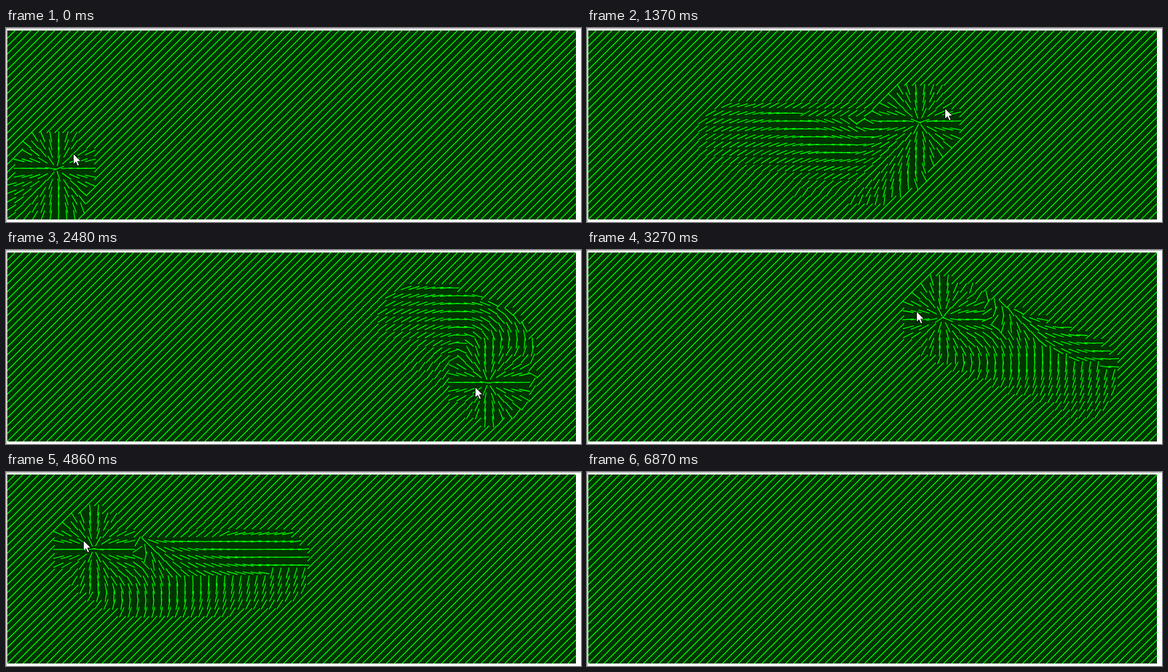
Write an HTML page with a canvas that moves like this. It is 910x308 px and loops after 7710 ms.

```html
<!DOCTYPE html>
<html lang="en">
<head>
<meta charset="utf-8">
<title>Line field</title>
<style>
  html, body { margin: 0; width: 100%; height: 100%; overflow: hidden; background: #fff; }
  canvas { display: block; }
</style>
</head>
<body>
<canvas id="stage" width="910" height="308"></canvas>
<script>
const ctx = document.getElementById('stage').getContext('2d');
const LOOP = 7710;
const TICK = 134.8;      // ms between picture updates
const LAST_TICK = 48;
const FIELD = { x: 2, y: 4, w: 900, h: 300 };
const CELL = 12.5;
const HALF = CELL / Math.SQRT2;
const REACH = 62.5;
const REST = -Math.PI / 4;
const DECAY = 1.7;       // ticks
const SETTLED = 9.4;     // ticks until a line is back at rest
const SAMPLE = 0.06;     // ticks

// Turning points of the pointer's sweeps: tick, x, y
const path = [
  [-1.6, 60, 280], [0, 80, 224], [1, 107, 200],
  [4.5, 425, 180], [6.8, 235, 180], [9, 405, 208], [9.5, 468, 210],
  [10, 526, 150], [11, 567, 128],
  [13.8, 772, 212], [15.2, 650, 121], [16.4, 735, 132], [17.2, 775, 168],
  [18, 763, 211], [19, 743, 218],
  [21.4, 775, 195], [22.4, 660, 153], [24, 563, 107], [25, 522, 98],
  [27.4, 610, 120], [28.3, 420, 102], [29.2, 355, 122],
  [31, 278, 166], [32, 237, 174],
  [33.2, 420, 150], [33.8, 310, 166], [34.6, 200, 166],
  [36, 139, 122], [37, 123, 109], [38.6, 4, 82]
];
const pathStart = path[0][0];
const pathEnd = path[path.length - 1][0];

// Position on a smooth curve through the path points
function pointer(t) {
  let i = 0;
  while (i < path.length - 2 && path[i + 1][0] <= t) i++;
  const a = path[i], b = path[i + 1];
  const before = path[Math.max(i - 1, 0)];
  const after = path[Math.min(i + 2, path.length - 1)];
  const span = b[0] - a[0];
  const u = (t - a[0]) / span;
  const axis = k => {
    const m0 = (b[k] - before[k]) / (b[0] - before[0]) * span;
    const m1 = (after[k] - a[k]) / (after[0] - a[0]) * span;
    const u2 = u * u, u3 = u2 * u;
    return (2 * u3 - 3 * u2 + 1) * a[k] + (u3 - 2 * u2 + u) * m0 +
      (3 * u2 - 2 * u3) * b[k] + (u3 - u2) * m1;
  };
  return { t, x: axis(1), y: axis(2) };
}

// Pointer positions that still matter, newest first
function recentPoints(t) {
  const points = [];
  const oldest = Math.max(pathStart, t - SETTLED);
  for (let s = Math.min(t, pathEnd); s > oldest; s -= SAMPLE) points.push(pointer(s));
  return points;
}

// A line faces the pointer within reach, then eases back to rest
function lineAngle(x, y, t, points) {
  for (const p of points) {
    const dx = p.x - x, dy = p.y - y;
    if (dx * dx + dy * dy > REACH * REACH) continue;
    return REST + (Math.atan2(dy, dx) - REST) * Math.exp((p.t - t) / DECAY);
  }
  return REST;
}

function drawField(t) {
  const { x: left, y: top, w, h } = FIELD;
  const points = recentPoints(t);
  ctx.save();
  ctx.beginPath();
  ctx.rect(left, top, w, h);
  ctx.clip();
  ctx.fillStyle = '#030';
  ctx.fillRect(left, top, w, h);
  ctx.beginPath();
  for (let y = top + CELL / 2; y < top + h; y += CELL) {
    for (let x = left + CELL / 2; x < left + w; x += CELL) {
      const a = lineAngle(x, y, t, points);
      const dx = Math.cos(a) * HALF, dy = Math.sin(a) * HALF;
      ctx.moveTo(x - dx, y - dy);
      ctx.lineTo(x + dx, y + dy);
    }
  }
  ctx.strokeStyle = '#0f0';
  ctx.lineWidth = 1.35;
  ctx.stroke();
  ctx.restore();
}

const arrow = new Path2D('M0 0V17L4 13.2L6.6 19.4L9.4 18.2L6.8 12.2H12Z');

function drawCursor({ x, y }) {
  ctx.save();
  ctx.translate(Math.round(x) - 0.5, Math.round(y) - 0.5);
  ctx.fillStyle = '#fff';
  ctx.strokeStyle = '#000';
  ctx.lineWidth = 1;
  ctx.fill(arrow);
  ctx.stroke(arrow);
  ctx.restore();
}

function draw(tick) {
  ctx.fillStyle = '#fff';
  ctx.fillRect(0, 0, 910, 308);
  ctx.fillStyle = '#aaa';
  ctx.fillRect(0, 0, 910, 1);
  ctx.fillRect(0, 0, 1, 308);
  drawField(tick);
  // The cursor runs one update ahead of the lines
  if (tick + 1 <= pathEnd) drawCursor(pointer(tick + 1));
}

const origin = performance.now();
let shown = -1;

function loop() {
  const time = (performance.now() - origin) % LOOP;
  const tick = Math.min(Math.floor(time / TICK), LAST_TICK);
  if (tick !== shown) draw(shown = tick);
  requestAnimationFrame(loop);
}
loop();
</script>
</body>
</html>
```
